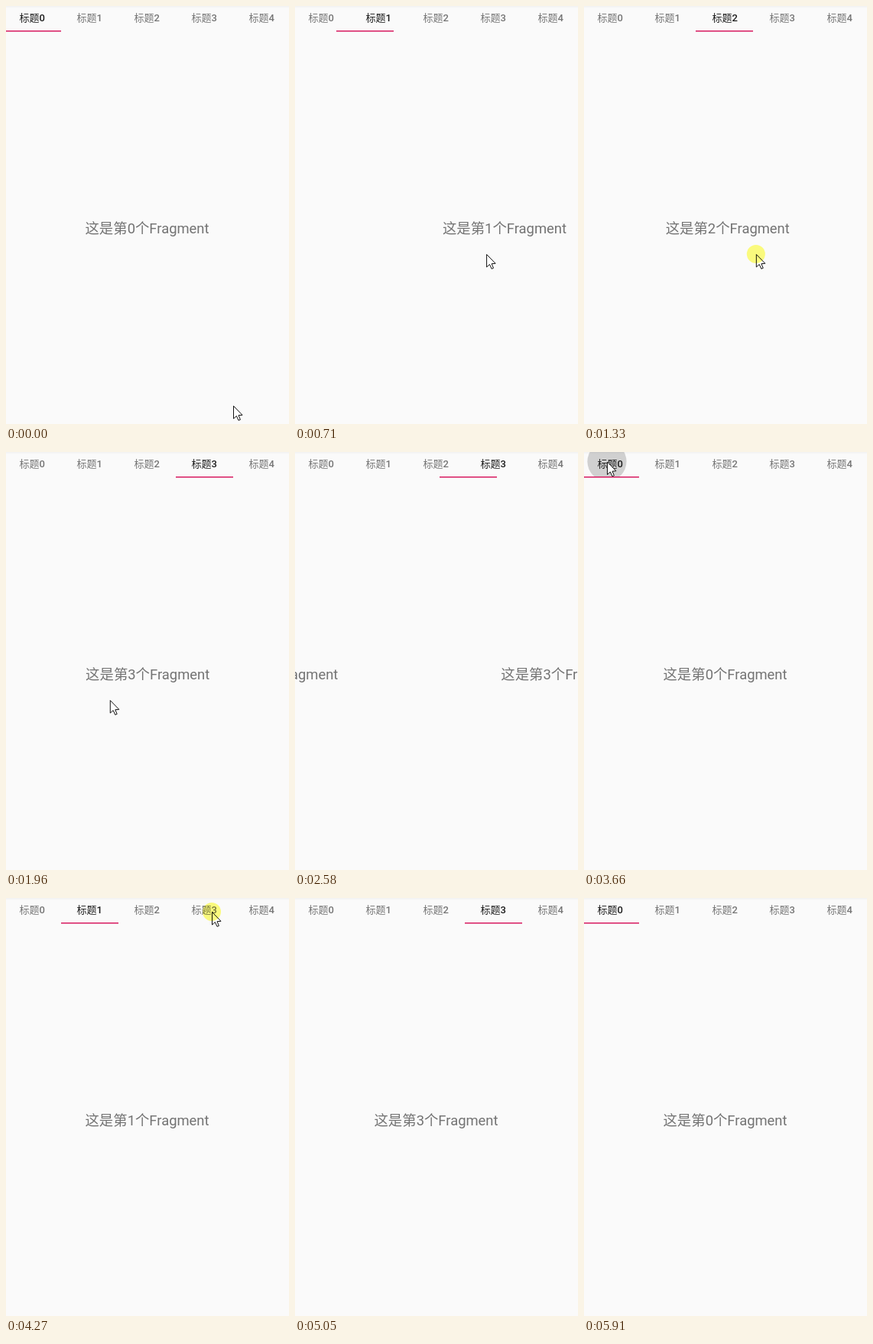
These frames come from a looping animation (370 by 546 pixels, 6450 ms). An HTML page with a canvas:

```html
<!DOCTYPE html>
<html lang="zh-CN">
<head>
<meta charset="utf-8">
<title>Tabs</title>
<style>
html, body { margin: 0; width: 100%; height: 100%; overflow: hidden; background: #fafafa; }
canvas { display: block; width: 370px; height: 546px; }
</style>
</head>
<body>
<canvas id="stage"></canvas>
<script>
const W = 370, H = 546, LOOP = 6450;
const TAB = 75, LEFT = -3, PAGE = 375, BAR = 33;
const FIRST = 70, STEP = 4200 / 54;
const SETTLE = 300, LINGER = 100, RIPPLE = 360;
const FONT = 'Roboto, "Noto Sans CJK SC", "Noto Sans CJK", sans-serif';

const canvas = document.getElementById('stage');
const ctx = canvas.getContext('2d');
const dpr = window.devicePixelRatio || 1;
canvas.width = W * dpr;
canvas.height = H * dpr;

const swipe = (down, up, x, endX, y) =>
  ({ down, up, x, endX, y, dir: Math.sign(x - endX) });
const tap = (down, up, tab, x, y) => ({ down, up, tab, x, y });

const swipes = [
  swipe(430, 630, 329, 240, 324),
  swipe(1000, 1140, 300, 190, 324),
  swipe(1314, 1730, 225, 75, 324),
  swipe(2240, 2640, 225, 433, 324),
  swipe(2900, 3000, 330, 220, 308),
  swipe(3190, 3310, 300, 170, 308),
];
const taps = [
  tap(3560, 3580, 0, 30, 12.5),
  tap(3880, 3900, 1, 109, 16),
  tap(4260, 4430, 3, 269, 18),
  tap(5340, 5380, 0, 34, 16),
];
const gestures = [...swipes, ...taps];

// The pointer travels straight from one gesture to the next.
const stop = (t, x, y) => ({ t, x, y });
const path = [
  stop(0, 297, 522), stop(FIRST, 297, 522),
  ...swipes.flatMap(s => [stop(s.down, s.x, s.y), stop(s.up, s.endX, s.y)]),
  ...taps.flatMap(p => [stop(p.down, p.x, p.y), stop(p.up + LINGER, p.x, p.y)]),
  stop(4820, -10, 5), stop(5040, -40, 5), stop(5890, 360, 570),
].sort((a, b) => a.t - b.t);

const clamp = u => Math.max(0, Math.min(1, u));
const mix = (a, b, u) => a + (b - a) * u;
const easeOut = u => 1 - (1 - u) ** 5;
const snap = t =>
  t < FIRST ? 0 : FIRST + Math.floor((t - FIRST) / STEP + 1e-6) * STEP;

function pointerAt(t) {
  const i = path.findLastIndex(s => s.t <= t);
  const a = path[i], b = path[i + 1] || a;
  const u = clamp((t - a.t) / (b.t - a.t || 1));
  return { x: mix(a.x, b.x, u), y: mix(a.y, b.y, u) };
}

// Pages moved by one swipe: follow the finger, then settle.
function swiped(s, t) {
  const drag = clamp((t - s.down) / (s.up - s.down)) * (s.x - s.endX) / PAGE;
  return mix(drag, s.dir, easeOut(clamp((t - s.up) / SETTLE)));
}

function stateAt(t) {
  const last = taps.findLast(p => p.up <= t);
  if (last) return { pos: last.tab, selected: last.tab };
  return {
    pos: swipes.reduce((sum, s) => sum + swiped(s, t), 0),
    selected: swipes.reduce((sum, s) => sum + (s.up <= t ? s.dir : 0), 0),
  };
}

function disc(x, y, r, color) {
  ctx.fillStyle = color;
  ctx.beginPath();
  ctx.arc(x, y, r, 0, Math.PI * 2);
  ctx.fill();
}

function drawBackground() {
  const shade = ctx.createLinearGradient(0, 0, 0, 3);
  shade.addColorStop(0, '#f1f1f1');
  shade.addColorStop(1, '#fafafa');
  ctx.fillStyle = shade;
  ctx.fillRect(0, 0, W, H);
}

function drawRipples(t) {
  ctx.save();
  ctx.beginPath();
  ctx.rect(0, 0, W, BAR);
  ctx.clip();
  for (const { up, x, y } of taps) {
    const age = t - up;
    if (age < 0 || age >= RIPPLE) continue;
    const fade = clamp((RIPPLE - age) / 200);
    disc(x, y, Math.min(45, 12 + age / 5), `rgba(0,0,0,${.17 * fade})`);
  }
  ctx.restore();
}

function drawTabs(pos, selected) {
  ctx.font = `500 13px ${FONT}`;
  for (let i = 0; i < 5; i++) {
    ctx.fillStyle = i === selected ? '#1c1c1c' : '#757575';
    ctx.fillText('标题' + i, LEFT + TAB * (i + .5) - .4, 20);
  }
  ctx.fillStyle = '#d81b60';
  ctx.fillRect(Math.round(LEFT + TAB * pos), 32, TAB, 1.5);
}

function drawPages(pos) {
  ctx.font = `400 18.4px ${FONT}`;
  ctx.fillStyle = '#737373';
  for (let i = Math.floor(pos); i <= Math.ceil(pos); i++) {
    ctx.fillText(`这是第${i}个Fragment`, LEFT + PAGE * (i - pos + .5), 297);
  }
}

function drawPointer({ x, y }, down) {
  ctx.save();
  ctx.translate(x + .5, y + .5);
  ctx.beginPath();
  [[0, 0], [0, 16.5], [3.9, 13], [6.5, 18.8], [8.9, 17.8], [6.5, 12.2], [11.5, 11.8]]
    .forEach(([px, py]) => ctx.lineTo(px, py));
  ctx.closePath();
  ctx.fillStyle = '#fff';
  ctx.fill();
  ctx.lineWidth = 1;
  ctx.strokeStyle = '#111';
  ctx.stroke();
  ctx.restore();
  if (!down) return;
  ctx.globalCompositeOperation = 'multiply';
  disc(x, y, 12, '#ffff80');
  ctx.globalCompositeOperation = 'source-over';
}

function draw(t) {
  const { pos, selected } = stateAt(t);
  const down = gestures.some(g => t >= g.down && t < g.up);
  ctx.setTransform(dpr, 0, 0, dpr, 0, 0);
  ctx.textAlign = 'center';
  drawBackground();
  drawRipples(t);
  drawTabs(pos, selected);
  drawPages(pos);
  drawPointer(pointerAt(t), down);
}

function tick() {
  draw(snap(performance.now() % LOOP));
  requestAnimationFrame(tick);
}
tick();
</script>
</body>
</html>
```
